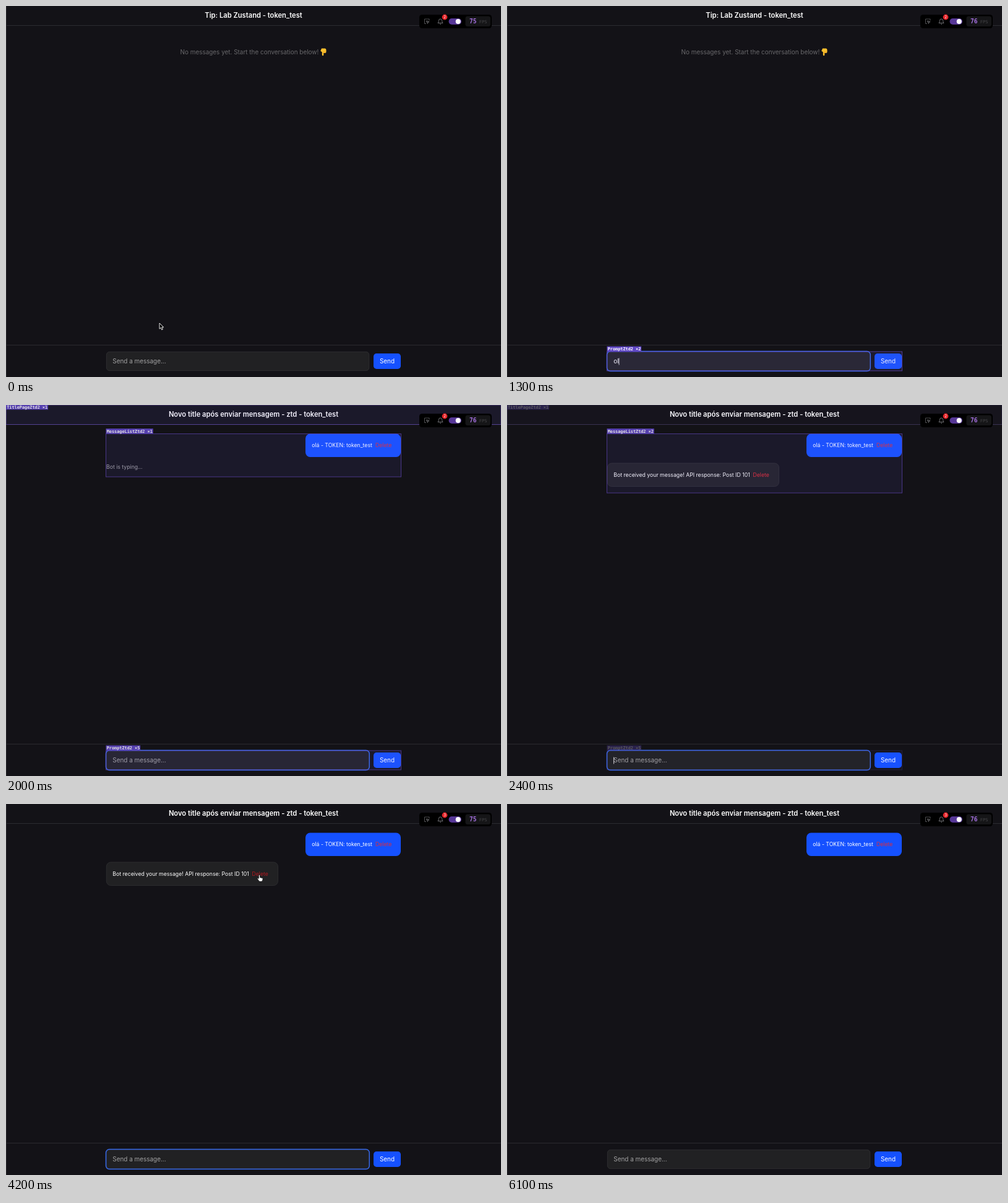
An HTML page that plays this animation: 800 px wide and 599 px high, repeating every 6.2 s.

```html
<!DOCTYPE html>
<html lang="en">
<head>
<meta charset="utf-8">
<title>Chat</title>
<style>
  html, body { margin: 0; width: 100%; height: 100%; overflow: hidden; background: #131217; }
  svg { display: block; width: 800px; height: 599px; }
  text { font: 9.94px Inter, sans-serif; fill: #fff; white-space: pre; }
  .title { font-size: 11.18px; font-weight: 600; }
  .mid { text-anchor: middle; }
  .small { font-size: 8.7px; }
  .delete { font-size: 8.7px; fill: #e22b36; }
  .delete.hover { fill: #b0181f; }
  .mono { font-family: "DejaVu Sans Mono", monospace; }
  .tag { font: bold 6.85px "DejaVu Sans Mono", monospace; }
  .line { stroke: #2b2b30; }
  .icon { fill: none; stroke: #8a8a8e; stroke-width: .8; }
</style>
</head>
<body>
<svg viewBox="0 0 800 599">
  <rect width="800" height="599" fill="#131217"/>
  <path class="line" d="M0 31.5H800M0 547.5H800M.5 0V599" fill="none"/>
  <text id="title" class="title mid" x="400" y="18.5"></text>

  <g id="empty">
    <text x="281.5" y="77.5" fill-opacity=".36">No messages yet. Start the conversation below!</text>
    <path d="M510 68.5h5.5q2 0 2 2.5v3q0 2-1.8 2h-2.4v3q0 1.3-1.2 1.3t-1.3-1.3v-4.500l-2-1.500q-.8-.8 0-1.500z" fill="#fbc02d"/>
    <path d="M513.300 73v3M515.300 73.500v2.300" stroke="#d98a1c" stroke-width=".6"/>
  </g>

  <g id="sent">
    <rect x="484" y="46.500" width="154" height="37.500" rx="7.500" fill="#1551ff"/>
    <text class="small" x="494.300" y="68">olá - TOKEN: token_test</text>
    <text class="delete" x="597" y="68">Delete</text>
  </g>
  <text id="typing" class="small" x="162" y="103" font-style="italic" fill-opacity=".6">Bot is typing...</text>
  <g id="reply">
    <rect x="162.300" y="94" width="277.200" height="37.500" rx="7" fill="#212123" stroke="#303033" stroke-width=".8"/>
    <text class="small" x="172.300" y="116">Bot received your message! API response: Post ID 101</text>
    <text id="remove" class="delete" x="397.500" y="116">Delete</text>
  </g>

  <rect x="162.400" y="558.400" width="424.400" height="30.300" rx="4.800" fill="#212123" stroke="#343437" stroke-width=".8"/>
  <rect id="ring" x="161.500" y="557.600" width="425.800" height="32" rx="5.500" fill="none" stroke="#3567e8" stroke-width="1.500"/>
  <text id="draft" x="172.300" y="577.300"></text>
  <rect id="caret" y="568.500" width=".8" height="11" fill="#fff"/>
  <rect x="594" y="561" width="44" height="25" rx="4.800" fill="#1551ff"/>
  <text class="mid" x="616" y="577.300" font-weight="500">Send</text>

  <g id="outlines"></g>

  <rect x="668" y="14" width="117" height="22" rx="4.500" fill="#000"/>
  <path class="icon" d="M678.500 28.500h-2v-7.500h7.500v2.500" stroke-dasharray="1.600 .7"/>
  <path class="icon" d="M679.500 24l4.500 1.500-1.900.8-.7 2z"/>
  <path class="icon" d="M698 27.500q1.400-1.400 1.400-4a2.600 2.600 0 0 1 5.200 0q0 2.600 1.400 4zM701 29.300h2"/>
  <circle cx="709" cy="18" r="4.400" fill="#e5252a"/>
  <text id="badge" class="mid" x="709" y="20.200" style="font-size:6px"></text>
  <rect x="715.500" y="20" width="20.500" height="10" rx="5" fill="#573797"/>
  <circle cx="730.700" cy="25" r="4" fill="#fff"/>
  <rect x="742.500" y="16.500" width="40.500" height="16.500" rx="3.500" fill="#151517"/>
  <text id="fps" class="mono" x="749" y="28.300" style="font:bold 9.600px 'DejaVu Sans Mono',monospace;fill:#a36fdd"></text>
  <text class="mono" x="764.800" y="27.500" style="font:7px 'DejaVu Sans Mono',monospace;fill:#454548">FPS</text>

  <g id="pointer">
    <path id="arrow" d="M0 0v9.300l2.200-2 1.500 3.500 1.700-.8-1.500-3.300h2.900z" fill="#000" stroke="#fff" stroke-width=".9" stroke-linejoin="round"/>
    <path id="hand" d="M-.9 1q0-1 .9-1t1 1v3.200l3.700.9q1 .4.9 1.500l-.6 2.300q-.3 1.600-1.600 1.600h-2.700q-1 0-1.600-1l-2-3q-.5-1 .3-1.300t1.700.9z" fill="#fff" stroke="#000" stroke-width=".6"/>
    <path id="beam" d="M-2-5q2 0 2 1.500v7q0 1.500-2 1.500M2-5q-2 0-2 1.500m0 7q0 1.500 2 1.500" fill="none" stroke="#ddd" stroke-width=".8"/>
  </g>
</svg>
<script>
const LOOP = 6200, STEP = 100, FADE = 750;
const FOCUS = 600, SEND = 1850, REPLY = 2250, DELETE = 4700;
const KEYS = [[1050, 'o'], [1250, 'ol'], [1500, 'olá']];

// Render flashes: start, component, count, x, y, width, height
const RENDERS = [
  ...KEYS.map(([at], i) => [at, 'PromptZtd2', i + 1, 161.5, 558, 477, 31]),
  [SEND, 'PromptZtd2', 5, 161.5, 558, 477, 31],
  [SEND, 'TitlePageZtd2', 1, 0, 0, 800, 31.5],
  [SEND, 'MessageListZtd2', 1, 161.5, 46.5, 477, 69.5],
  [REPLY, 'MessageListZtd2', 2, 161.5, 46.5, 477, 95.5],
  [DELETE, 'MessageListZtd2', 1, 161.5, 46.5, 477, 47.5],
];

// Pointer path: time, x, y
const PATH = [[100, 248, 512], [550, 313, 572], [2800, 313, 572], [2950, 314, 542],
  [3100, 314, 542], [4000, 409.5, 114.5]];

const $ = id => document.getElementById(id);
const show = (id, on) => $(id).setAttribute('visibility', on ? 'inherit' : 'hidden');
const setText = (id, value) => { if ($(id).textContent !== value) $(id).textContent = value; };
const latest = (list, t) => list.filter(item => item[0] <= t).pop();

function pointerAt(t) {
  const next = PATH.findIndex(p => p[0] > t);
  if (next < 0) return PATH.at(-1).slice(1);
  if (next === 0) return PATH[0].slice(1);
  const [t0, x0, y0] = PATH[next - 1], [t1, x1, y1] = PATH[next];
  const u = (t - t0) / (t1 - t0), k = u * u * (3 - 2 * u);
  return [x0 + (x1 - x0) * k, y0 + (y1 - y0) * k];
}

function outlineMarkup(t) {
  const active = new Map();
  for (const r of RENDERS) if (r[0] <= t && t < r[0] + FADE) active.set(r[1], r);
  return [...active.values()].map(([at, name, count, x, y, w, h]) => {
    const alpha = Math.min(1, 1.1 * (1 - (t - at) / FADE));
    const label = `${name} ×${count}`, top = Math.max(y - 8.5, -1);
    return `<g opacity="${alpha}">
      <rect x="${x}" y="${y}" width="${w}" height="${h}" fill="#7361e6" fill-opacity=".1" stroke="#7050d8" stroke-opacity=".65"/>
      <rect x="${x}" y="${top}" width="${label.length * 4.125 + 2}" height="8.5" fill="#5f46c4"/>
      <text class="tag" x="${x + 1.2}" y="${top + 6.6}">${label}</text></g>`;
  }).join('');
}

function draw(t) {
  const sent = t >= SEND, focused = t >= FOCUS && t < DELETE;
  const replied = t >= REPLY && t < DELETE;
  setText('title', sent ? 'Novo title após enviar mensagem - ztd - token_test' : 'Tip: Lab Zustand - token_test');
  show('empty', !sent);
  show('sent', sent);
  show('typing', sent && t < REPLY);
  show('reply', replied);
  show('ring', focused);

  const key = !sent && latest(KEYS, t), draft = key ? key[1] : '';
  setText('draft', draft || 'Send a message...');
  $('draft').setAttribute('fill-opacity', draft ? 1 : .58);
  const typing = t >= KEYS[0][0] && !sent;
  show('caret', focused && (typing || (t % 1000 >= 300 && t % 1000 < 800)));
  $('caret').setAttribute('x', 172.3 + (draft ? $('draft').getComputedTextLength() : 0));

  $('outlines').innerHTML = outlineMarkup(t);
  setText('badge', t < 2700 ? '2' : '3');
  setText('fps', (t >= 400 && t < 3400) || t >= 5500 ? '76' : '75');

  const [x, y] = pointerAt(t);
  const overInput = y > 558, overDelete = replied && t > 3500 && y < 122;
  show('pointer', t < KEYS[0][0] || (t >= 2800 && t < 5500));
  $('pointer').setAttribute('transform', `translate(${x} ${y})`);
  show('beam', overInput);
  show('hand', overDelete);
  show('arrow', !overInput && !overDelete);
  $('remove').classList.toggle('hover', overDelete);
}

function tick(now) {
  draw(Math.floor((now % LOOP) / STEP) * STEP);
  requestAnimationFrame(tick);
}
requestAnimationFrame(tick);
</script>
</body>
</html>
```
